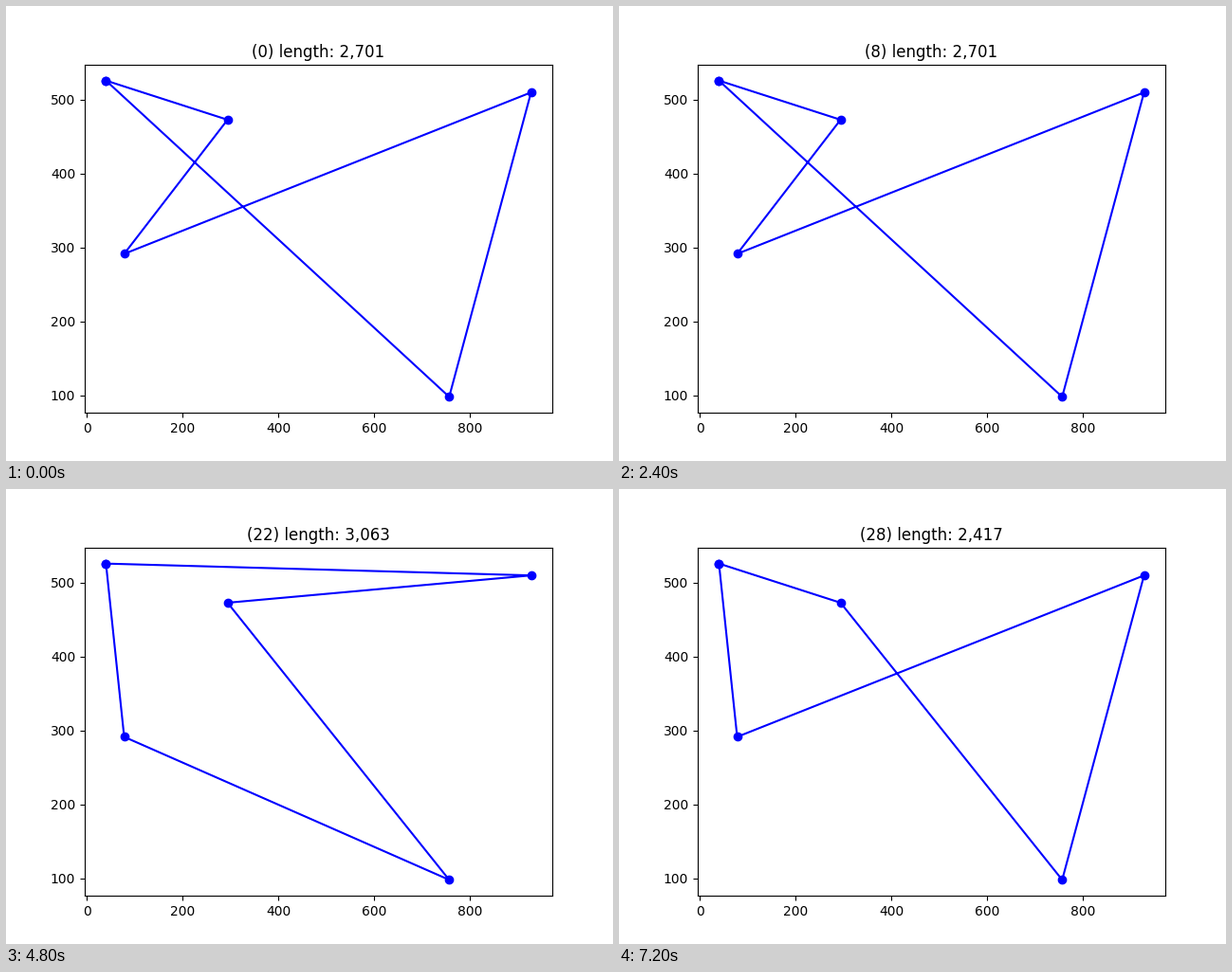
Animation of 640x480 px, one loop 8000 ms. Source, as a matplotlib script:

```python
import matplotlib.pyplot as plt
from matplotlib.animation import FuncAnimation

W, H, DPI = 640, 480, 100
LEFT, RIGHT, TOP, BOTTOM = 83, 576, 62, 429  # plot box in pixels

CITIES = {
    "A": (40, 526),
    "B": (294, 473),
    "C": (78, 291.5),
    "D": (928, 510),
    "E": (757, 98),
}

# (step number, visiting order, tour length)
STEPS = [
    (0, "ABCDE", 2701),
    (2, "ADCBE", 3479),
    (4, "ABEDC", 2417),
    (8, "ABCDE", 2701),
    (12, "ACDBE", 3181),
    (20, "ABDEC", 2285),
    (22, "ADBEC", 3063),
    (24, "ABCED", 2583),
    (26, "ADBEC", 3063),
    (28, "ABEDC", 2417),
]

plt.rcParams["font.family"] = "DejaVu Sans"
fig = plt.figure(figsize=(W / DPI, H / DPI), dpi=DPI, facecolor="white")
ax = fig.add_axes([LEFT / W, 1 - BOTTOM / H, (RIGHT - LEFT) / W, (BOTTOM - TOP) / H])


def closed_tour(order):
    """Coordinates of the tour, back to its first city."""
    return zip(*(CITIES[c] for c in order + order[0]))


line, = ax.plot(*closed_tour("ABCDE"), "bo-", linewidth=1.5, markersize=6)
ax.set_xticks(range(0, 801, 200))
ax.set_yticks(range(100, 501, 100))
xs, ys = zip(*CITIES.values())
for limits, vals in ((ax.set_xlim, xs), (ax.set_ylim, ys)):
    pad = 0.05 * (max(vals) - min(vals))
    limits(min(vals) - pad, max(vals) + pad)
title = ax.set_title("", fontsize=12)


def draw(i):
    number, order, length = STEPS[i]
    x, y = closed_tour(order)
    line.set_data(x, y)
    title.set_text(f"({number}) length: {length:,}")
    return line, title


anim = FuncAnimation(fig, draw, frames=len(STEPS), init_func=lambda: draw(0),
                     interval=800, repeat=True, repeat_delay=0, blit=False)
plt.show()
```
